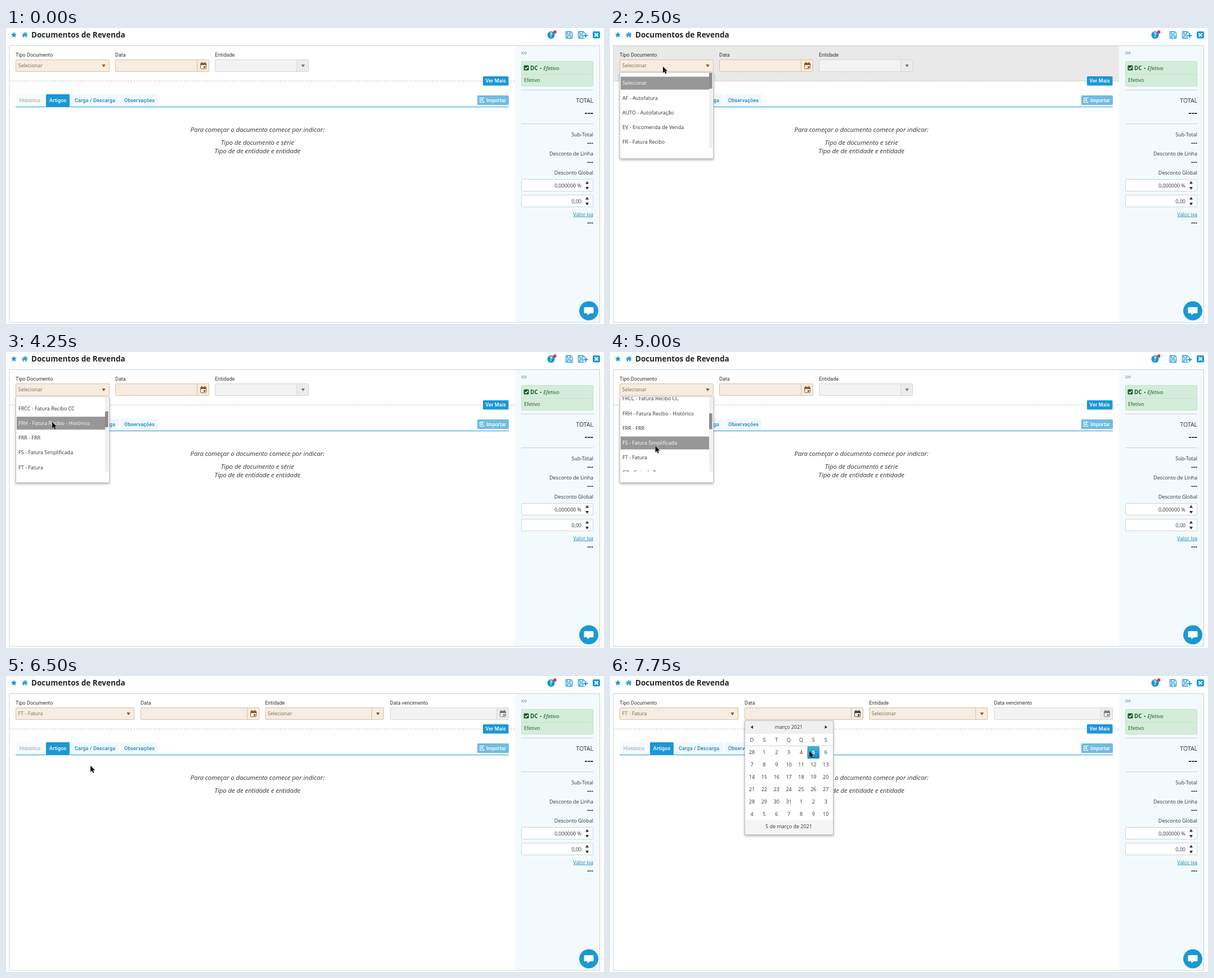
An HTML page that plays this animation: 1062x527 px, repeating every 8 s.

```html
<!DOCTYPE html>
<html lang="pt">
<head>
<meta charset="utf-8">
<title>Documentos de Revenda</title>
<style>
  html, body { margin: 0; width: 100%; height: 100%; overflow: hidden; background: #fff; }
  svg { display: block; width: 100vw; height: 100vh; }
  text { white-space: pre; }
</style>
</head>
<body>
<svg id="stage" viewBox="0 0 1062 527"></svg>
<script>
const LOOP = 8000, STEP = 250;
const BLUE = '#1a98d5', INK = '#333', BROWN = '#7d6a58';
const SANS = "'Open Sans', 'Noto Sans', sans-serif", ROBOTO = 'Roboto, sans-serif';

// Keyframes are [time, value] pairs, joined linearly.
const pointerX = [[750, 172], [1000, 122], [1250, 85], [1500, 85], [1750, 94], [2500, 94], [3000, 82],
  [3250, 81], [4250, 82], [5250, 80], [6250, 80], [6500, 150], [6750, 320], [7000, 432], [7250, 432], [7750, 354]];
const pointerY = [[750, 83], [1000, 62], [1250, 47], [1500, 47], [1750, 69], [2500, 69], [3000, 124],
  [4250, 125], [5250, 182], [6250, 182], [6500, 160], [6750, 92], [7000, 69], [7250, 69], [7750, 134]];
const hoverShade = [[1500, 0], [1750, .65], [2000, 1], [2750, 1], [3000, 0], [6500, 0], [7000, 1], [7500, 1], [7750, 0]];
const listOpen = [[2000, 0], [2500, 1], [5250, 1], [5500, 0]];
const listScroll = [[2750, 0], [3000, 25], [3250, 59.6], [4250, 129], [5250, 152]];
const loading = [[5500, 0], [5750, .564], [6000, 1]];

const options = ['Selecionar', 'AF - Autofatura', 'AUTO - Autofaturação', 'EV - Encomenda de Venda',
  'FR - Fatura Recibo', 'FRCC - Fatura Recibo CC', 'FRH - Fatura Recibo - Histórico', 'FRR - FRR',
  'FS - Fatura Simplificada', 'FT - Fatura', 'GR - Guia de Remessa', 'GT - Guia de Transporte'];

function at(keys, t) {
  if (t <= keys[0][0]) return keys[0][1];
  for (let i = 1; i < keys.length; i++) {
    const [t0, a] = keys[i - 1], [t1, b] = keys[i];
    if (t <= t1) return a + (b - a) * (t - t0) / (t1 - t0);
  }
  return keys[keys.length - 1][1];
}

const attrs = o => Object.entries(o).map(([k, v]) => ` ${k}="${v}"`).join('');
const rect = (x, y, w, h, fill, o = {}) =>
  `<rect${attrs({ x, y, width: w, height: h, fill, ...o })}/>`;
const box = (x, y, w, h, fill, stroke, o) => rect(x + .5, y + .5, w - 1, h - 1, fill, { stroke, ...o });
const path = (d, fill, o = {}) => `<path${attrs({ d, fill, ...o })}/>`;
const stroke = (d, color, width = 1, o = {}) => path(d, 'none', { stroke: color, 'stroke-width': width, ...o });
const group = (x, y, body) => `<g transform="translate(${x} ${y})">${body}</g>`;

// y is the middle of the capitals.
function text(x, y, value, { size = 9, color = INK, font = SANS, weight = 400, anchor = 'start', ...rest } = {}) {
  return `<text${attrs({ x, y: y + size * .36, fill: color, 'font-family': font, 'font-size': size,
    'font-weight': weight, 'text-anchor': anchor, ...rest })}>${value}</text>`;
}
const label = (x, y, value, o) => text(x, y, value, { font: ROBOTO, ...o });
const right = (y, value, o) => text(1043, y, value, { anchor: 'end', ...o });
const centred = (x, y, value, o) => text(x, y, value, { anchor: 'middle', ...o });
const triangle = (x, y, dir, color, w = 3.2) =>
  path(`M${x - w} ${y - 2.4 * dir}h${2 * w}l${-w} ${4.8 * dir}z`, color);

function calendarIcon(x, color) {
  return box(x - 5, 62, 11, 11, 'none', color, { rx: 1 }) + rect(x - 5, 63, 11, 3, color)
    + rect(x - 3, 60.5, 1.5, 3, color) + rect(x + 2.5, 60.5, 1.5, 3, color) + rect(x + 1, 68, 3, 3, color);
}

function field(x, w, title, { kind, value = '', active = true, focus = false, iconColor }) {
  const line = focus ? '#73c5e8' : active ? '#dcbf9f' : '#d6d6d6';
  const ink = iconColor || (active ? '#8a5a2b' : '#777');
  const mid = x + w - 11;
  let out = label(x, 48, title);
  if (focus) out += rect(x - 1, 55, w + 2, 24, 'none', { stroke: '#8fd6f3', 'stroke-width': 2.5, opacity: .6, rx: 2 });
  out += box(x, 56, w, 22, active ? '#f6ece1' : '#f3f3f3', line, { rx: 1.5 });
  if (kind !== 'select') {
    if (!active) out += rect(x + w - 21, 57, 20, 20, '#ececec');
    out += rect(x + w - 22, 56, 1, 22, line);
  }
  out += kind === 'date' ? calendarIcon(mid, ink) : triangle(mid + .5, 67.5, 1, ink);
  return out + text(x + 4.5, 67, value, { color: BROWN });
}

function floppy(x) {
  return stroke(`M${x - 5.5} 6.5h8.5l2.5 2.5v9h-11zM${x - 3} 7v4h5v-4M${x - 3} 18v-4h6v4`, BLUE, 1.3);
}

function topBar() {
  return path('M14 7l1.5 3.3 3.6.4-2.7 2.4.8 3.6-3.2-1.8-3.2 1.8.8-3.6-2.7-2.4 3.6-.4z', BLUE)
    + path('M28 12.6L33.3 7.6l2 1.9V8h1.5v2.9l1.8 1.7-.8.8-4.5-4.2-4.5 4.2zM29.8 13l3.5-3.2 3.5 3.2v3.6h-2.5v-2.8h-2v2.8h-2.5z', BLUE)
    + text(45, 12.3, 'Documentos de Revenda', { size: 13.5, weight: 700, color: '#1f252b' })
    + `<circle cx="968" cy="12.5" r="6.6" fill="${BLUE}"/>`
    + centred(968, 12.6, '?', { size: 10.5, weight: 700, color: '#fff' })
    + '<circle cx="974.7" cy="7.2" r="2.9" fill="#e0364c"/>'
    + floppy(1000) + floppy(1022) + rect(1025.5, 10, 8, 8, '#fff')
    + stroke('M1029.5 9.5v8M1025.5 13.5h8', BLUE, 1.9)
    + rect(1042, 6, 13, 12.5, BLUE, { rx: 2 }) + stroke('M1045.5 9.2l6 6m0-6l-6 6', '#fff', 2.1);
}

function spinner(y, value) {
  return box(915, y, 128, 22, '#fff', '#cfd3d6', { rx: 1.5 })
    + text(1022, y + 11.5, value, { anchor: 'end' })
    + triangle(1032, y + 6, -1, '#333', 3) + triangle(1032, y + 16.5, 1, '#333', 3);
}

function sidebar() {
  const green = '#175a2a', dashes = (y, size) => right(y, '---', { size, weight: 700 });
  return rect(904, 32, 150, 492, '#f3fafd')
    + stroke('M915.5 42l2 2.5-2 2.5m3.3-5l2 2.5-2 2.5m3.3-5l2 2.5-2 2.5', '#555', .9)
    + box(915, 59, 128, 45, '#d4edda', '#bfe2c8', { rx: 1.5 }) + rect(915, 82, 128, 1, '#c3e3cb')
    + rect(919.5, 66.5, 9, 9, green, { rx: 1.5 }) + stroke('M921.5 71l2 2 3.4-4', '#fff', 1.4)
    + text(931, 71, 'DC', { size: 9.75, weight: 700, color: green })
    + text(948, 71, '• <tspan font-style="italic">Efetivo</tspan>', { size: 9.75, color: green })
    + text(920, 93, 'Efetivo', { color: green })
    + rect(915, 110, 128, 1, '#c9ced1') + right(129.5, 'TOTAL', { size: 10.5 }) + dashes(150.5, 16)
    + rect(915, 170, 128, 1, '#c9ced1') + right(189.5, 'Sub-Total') + dashes(205, 11.5)
    + right(223.5, 'Desconto de Linha') + dashes(239, 11.5) + right(257.5, 'Desconto Global')
    + spinner(269, '0,000000 %') + spinner(297, '0,00')
    + right(331.5, 'Valor iva', { color: '#1b86bd', 'text-decoration': 'underline' }) + dashes(347, 11.5);
}

function tabs() {
  const tab = (x, w, name, fill, color, weight = 500) => rect(x, 118, w, 22, fill, { rx: 1.5 })
    + centred(x + w / 2, 128.7, name, { font: ROBOTO, color, weight, 'letter-spacing': .12 });
  return tab(17, 51, 'Histórico', '#f7fbfd', '#949a9e', 400) + tab(71, 42, 'Artigos', BLUE, '#fff')
    + tab(115, 86, 'Carga / Descarga', '#eff9fd', '#1b86bd') + tab(204, 66, 'Observações', '#eff9fd', '#1b86bd')
    + rect(17, 140, 876, 1, BLUE)
    + rect(837, 120, 56, 17, '#70bce2', { rx: 1.5 })
    + stroke('M846.5 124.5h-4.5v8h6.5v-2.5m1-5.5h-2q-2 0-2 3v2m-1.7-1.7l1.7 1.9 1.7-1.9', '#fff', 1.2)
    + label(853, 128.7, 'Importar', { color: '#fff', weight: 500 });
}

function message(lines) {
  const line = (y, s) => centred(446.5, y, s, { size: 11.25, 'font-style': 'italic' });
  return line(181, 'Para começar o documento comece por indicar:') + lines.map((s, i) => line(203.5 + 15 * i, s)).join('');
}

function header(t) {
  const chosen = t >= 5500, expanded = t >= 5750;
  const opened = t >= 2250 && t < 6500, picking = t >= 7000;
  const shade = rect(6.5, 32, 897.5, 63, '#e9e9e9', { opacity: at(hoverShade, t) });
  const first = { kind: 'select', value: chosen ? 'FT - Fatura' : 'Selecionar', focus: expanded && opened };
  const date = { kind: 'date', iconColor: picking ? '#444' : '' };
  const fields = expanded
    ? field(17, 211, 'Tipo Documento', first) + field(239, 211, 'Data', date)
      + field(460, 211, 'Entidade', { kind: 'combo', value: 'Selecionar' })
      + field(682, 211, 'Data vencimento', { kind: 'date', active: false })
    : field(17, 167, 'Tipo Documento', first) + field(194, 167, 'Data', date)
      + field(371, 167, 'Entidade', { kind: 'combo', active: false });
  return shade + stroke('M6 94.5H904', '#c8c8c8', 1, { 'stroke-dasharray': '3 2' }) + fields
    + rect(847, 86, 45.5, 16.5, BLUE, { rx: 1.5 })
    + centred(869.7, 94, 'Ver Mais', { font: ROBOTO, weight: 500, color: '#fff', 'letter-spacing': .1 });
}

function dropdown(t) {
  const open = at(listOpen, t);
  if (!open) return '';
  const scroll = at(listScroll, t);
  const hovered = t >= 2750 ? Math.round((at(pointerY, t) + scroll - 98.2) / 26.25) : 0;
  const rows = options.map((name, i) => {
    const y = 98.2 + 26.25 * i - scroll, on = i === hovered;
    return (on ? rect(19, y - 11.5, 157, 23, '#979797') : '') + text(22, y, name, { color: on ? '#fff' : INK });
  }).join('');
  return `<clipPath id="drop"><rect x="7" y="79" width="190" height="${166 * open}"/></clipPath>
    <clipPath id="list"><rect x="18" y="80" width="164" height="133"/></clipPath>
    <g clip-path="url(#drop)">${box(17, 79, 167, 154, '#fff', '#c4c4c4', { filter: 'url(#shadow)' })}
    <g clip-path="url(#list)">${rect(176, 80, 6, 133, '#f0f0f0')}${rows}
    ${rect(176, 80 + scroll * .2, 5.5, 28, '#8c8c8c')}</g></g>`;
}

function calendar(t) {
  if (t < 7250) return '';
  const column = i => 252 + 21.87 * i;
  const hovered = t >= 7750;
  let out = box(239, 79, 158, 204, '#fff', '#bdbdbd', { filter: 'url(#shadow)' })
    + rect(240, 80, 156, 23, '#f0f0f0') + rect(240, 257, 156, 25, '#f5f5f5')
    + path('M254 88v6l-4.5-3z', INK) + path('M381.5 88v6l4.5-3z', INK)
    + centred(317.5, 91, 'março 2021') + rect(240, 124, 156, 1, '#d2d2d2')
    + [...'DSTQQSS'].map((d, i) => centred(column(i), 113.5, d)).join('')
    + rect(350.5, 125, 21.5, 22, hovered ? 'url(#day)' : BLUE, { rx: 1.5 });
  for (let i = 0; i < 42; i++) {
    const day = new Date(2021, 1, 28 + i).getDate(), today = i === 5;
    out += centred(column(i % 7), 136 + 21.9 * Math.floor(i / 7), day,
      { color: today ? '#fff' : INK, weight: today ? 700 : 400 });
  }
  return out + centred(317.5, 267.5, '5 de março de 2021')
    + (t < 7750 ? rect(243, 61, 1, 13, '#555') : '');
}

function pointer(t) {
  if (t < 750) return '';
  return group(at(pointerX, t), at(pointerY, t),
    path('M0 -.5v11.4l2.6-2.4 1.8 4.2 2-.9-1.8-4H8z', '#111', { stroke: '#fff', 'stroke-width': .8, 'paint-order': 'stroke' }));
}

const defs = `<defs>
  <filter id="shadow" x="-10%" y="-10%" width="120%" height="125%">
    <feDropShadow dx="0" dy="2" stdDeviation="2.2" flood-opacity=".3"/></filter>
  <linearGradient id="day" x2="0" y2="1"><stop stop-color="#45b3e6"/><stop offset="1" stop-color="#1583bb"/></linearGradient>
</defs>`;
const chat = `<circle cx="1035" cy="503.5" r="17" fill="${BLUE}"/>`
  + path('M1028 497h14q1.5 0 1.5 1.5v8q0 1.5-1.5 1.5h-5l-4.5 3.5v-3.5h-4.500q-1.500 0-1.500-1.500v-8q0-1.500 1.500-1.500z', '#fff');
const frameLine = box(5.5, 31, 1049.5, 493.5, 'none', '#c9d1d6');
const fixed = { top: topBar() + sidebar(), tabs: tabs() };

function scene(t) {
  const progress = at(loading, t);
  const bar = t <= 6000 ? rect(17, 140, 876 * progress, 3, BLUE) : '';
  const lines = t < 5750 ? ['Tipo de documento e série', 'Tipo de de entidade e entidade'] : ['Tipo de de entidade e entidade'];
  return defs + fixed.top + header(t) + fixed.tabs + bar + message(lines) + frameLine + chat
    + dropdown(t) + calendar(t) + pointer(t);
}

const stage = document.getElementById('stage');
const start = performance.now();
let shown = -1;
function tick() {
  const elapsed = (performance.now() - start) % LOOP;
  const t = Math.floor(elapsed / STEP) * STEP;
  if (t !== shown) stage.innerHTML = scene(shown = t);
  requestAnimationFrame(tick);
}
tick();
</script>
</body>
</html>
```
